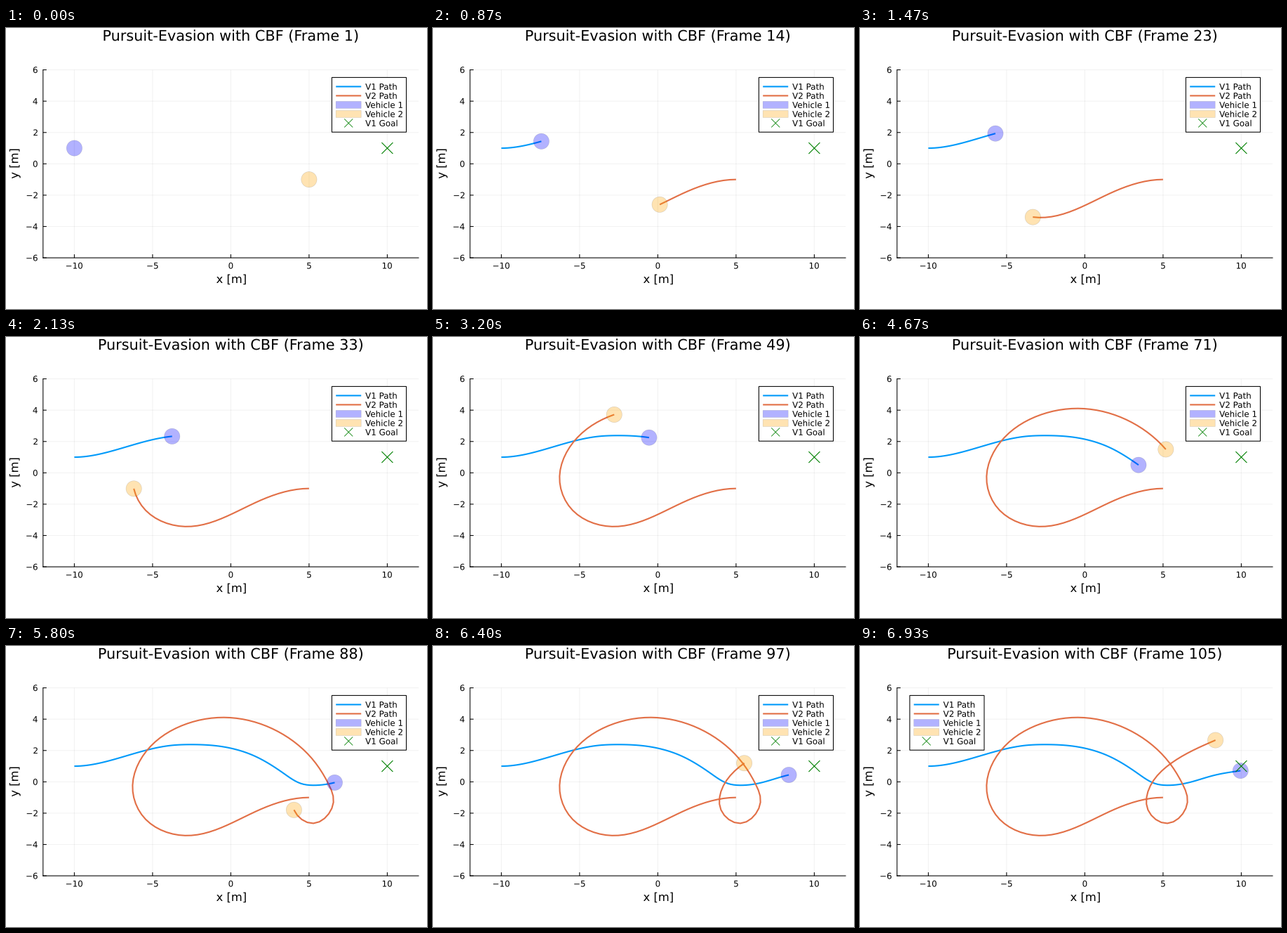
Write a matplotlib script that moves like this. It is 600x400 px and loops after 6.99 s.

```python
import numpy as np
import matplotlib.pyplot as plt
from matplotlib.animation import FuncAnimation
from matplotlib.patches import Circle, PathPatch, Rectangle
from matplotlib.textpath import TextPath
from matplotlib.transforms import Affine2D

W, H, DPI = 600, 400, 100
FRAMES, LOOP_MS = 105, 6990
LEGEND_SWAP = 103               # the legend avoids vehicle 2 from here on
UNIT, X0, Y0 = 22.3, 320.4, 193.35
PT = 72 / DPI                   # points per pixel

BLUE, ORANGE = "#009afa", "#e26f46"
FILL_1, FILL_2 = (0, 0, 1, 0.3), (1, 0.647, 0, 0.3)
EDGE, GRID = (0, 0, 0, 0.15), (0, 0, 0, 0.05)

plt.rcParams["font.family"] = "DejaVu Sans"
plt.rcParams["path.snap"] = False


def px(x):
    return X0 + UNIT * x


def py(y):
    return Y0 - UNIT * y


def drive(heading, *keys):
    """Constant-speed positions on a cubic spline through the key points.

    The spline leaves the first point along the heading."""
    p = np.array(keys)
    h = np.hypot(*np.diff(p, axis=0).T)
    t = np.r_[0, np.cumsum(h)]
    slope = np.diff(p, axis=0) / h[:, None]
    a, b = np.eye(len(p)), np.zeros_like(p)
    a[0, :2] = 2 * h[0], h[0]
    b[0] = 6 * (slope[0] - heading)
    for i in range(1, len(p) - 1):
        a[i, i - 1:i + 2] = h[i - 1], 2 * (h[i - 1] + h[i]), h[i]
        b[i] = 6 * (slope[i] - slope[i - 1])
    m = np.linalg.solve(a, b)

    s = np.linspace(0, t[-1], 3000)
    k = np.clip(np.searchsorted(t, s) - 1, 0, len(h) - 1)
    hk, u, v = h[k, None], (t[k + 1] - s)[:, None], (s - t[k])[:, None]
    c = ((m[k] * u**3 + m[k + 1] * v**3) / (6 * hk)
         + (p[k] / hk - m[k] * hk / 6) * u
         + (p[k + 1] / hk - m[k + 1] * hk / 6) * v)

    dist = np.r_[0, np.cumsum(np.hypot(*np.diff(c, axis=0).T))]
    at = np.linspace(0, dist[-1], FRAMES)
    return np.c_[px(np.interp(at, dist, c[:, 0])),
                 py(np.interp(at, dist, c[:, 1]))]


ROUTE_1 = drive(
    (1, 0), (-10, 1), (-7.43, 1.44), (-5.4, 2.02), (-3.75, 2.33),
    (-2.6, 2.38), (-0.56, 2.25), (1.4, 1.7), (3.42, 0.51), (4.55, -0.13),
    (5.3, -0.22), (6.63, -0.05), (8.2, 0.4), (9.95, 0.71))

ROUTE_2 = drive(
    (-1, 0), (5, -1), (2.05, -1.69), (0.1, -2.61), (-2.9, -3.43),
    (-5.54, -2.29), (-6.28, -0.38), (-5.34, 2.03), (-2.75, 3.73),
    (-0.45, 4.11), (2.22, 3.58), (5.2, 1.47), (6.26, -0.17), (6.56, -1.3),
    (5.28, -2.65), (4.04, -1.8), (4.15, -0.33), (5.44, 1.13), (8.35, 2.66))

fig = plt.figure(figsize=(W / DPI, H / DPI), dpi=DPI, facecolor="white")
ax = fig.add_axes([0, 0, 1, 1])
ax.set(xlim=(0, W), ylim=(H, 0))
ax.axis("off")


def line(xs, ys, color="black", width=1.05, z=1, cap="butt"):
    return ax.plot(xs, ys, color=color, lw=width * PT, zorder=z,
                   solid_capstyle=cap, solid_joinstyle="round")[0]


def glyphs(x, y, s, size, align=0.5, turn=0):
    """Outline of a text on baseline y; align 0 is left, 1 is right."""
    path = TextPath((0, 0), s, size=size)
    box = path.get_extents()
    place = Affine2D().translate(-box.x0 - align * box.width, 0)
    return path.transformed(place.scale(1, -1).rotate_deg(turn).translate(x, y))


def text(*args, z=3, **kw):
    return ax.add_patch(PathPatch(glyphs(*args, **kw), fc="black", lw=0,
                                  zorder=z))


def cross(x, y, r, width, z):
    return [line([x - r, x + r], [y - d * r, y + d * r], "green", width, z)
            for d in (1, -1)]


def outlined(shape, color, z):
    shape.set(facecolor=color, edgecolor=EDGE, linewidth=0.6 * PT, zorder=z)
    return ax.add_patch(shape)


def legend(x, y):
    """Legend with its top left corner at (x, y)."""
    z = 10
    parts = [ax.add_patch(Rectangle((x, y), 106.1, 77.8, fc="white",
                                    ec="black", lw=1.05 * PT, zorder=z))]
    rows = [y + 13 * (i + 1) for i in range(5)]
    left, right = x + 5.8, x + 41.8
    for row, color in zip(rows, (BLUE, ORANGE)):
        parts.append(line([left, right], [row, row], color, 2.1, z + 1))
    for row, color in zip(rows[2:], (FILL_1, FILL_2)):
        parts.append(outlined(
            Rectangle((left, row - 5), right - left, 10), color, z + 1))
    parts += cross((left + right) / 2, rows[4], 6, 0.8, z + 1)
    names = "V1 Path", "V2 Path", "Vehicle 1", "Vehicle 2", "V1 Goal"
    for row, name in zip(rows, names):
        parts.append(text(x + 47.8, row + 4.4, name, 11.9, align=0, z=z + 1))
    return parts


def minus(v):
    return str(v).replace("-", "\u2212")


# grid, axes and labels
west, east, north, south = px(-12), px(12), py(6), py(-6)
for v in range(-10, 11, 5):
    line([px(v)] * 2, [north, south], GRID, z=0)
    line([px(v)] * 2, [south, south - 5])
    text(px(v), 342.6, minus(v), 11.9)
for v in range(-6, 7, 2):
    line([west, east], [py(v)] * 2, GRID, z=0)
    line([west, west + 5], [py(v)] * 2)
    text(44.8, py(v) + 4.4, minus(v), 11.9, align=1)
line([west, east], [south, south], cap="projecting")
line([west, west], [north, south], cap="projecting")
text(px(0) + 0.5, 363, "x [m]", 16.35)
text(17.3, py(0), "y [m]", 16.35, turn=-90)
title = text(px(0), 18.1, "Pursuit", 20.8)

# moving parts
path_1 = line([], [], BLUE, 2.1, 4)
path_2 = line([], [], ORANGE, 2.1, 5)
car_1 = outlined(Circle((0, 0), UNIT / 2), FILL_1, 6)
car_2 = outlined(Circle((0, 0), UNIT / 2), FILL_2, 7)
cross(px(10), py(1), 8, 1.1, 8)
legend_right = legend(464.4, 70.4)
legend_left = legend(70.9, 70.4)


def update(i):
    title.set_path(glyphs(
        px(0), 18.1, f"Pursuit-Evasion with CBF (Frame {i + 1})", 20.8))
    for path, car, route in ((path_1, car_1, ROUTE_1),
                             (path_2, car_2, ROUTE_2)):
        path.set_data(*route[:i + 1].T)
        path.set_visible(i > 0)
        car.center = route[i]
    swapped = i >= LEGEND_SWAP
    for part in legend_right:
        part.set_visible(not swapped)
    for part in legend_left:
        part.set_visible(swapped)
    return []


anim = FuncAnimation(fig, update, frames=FRAMES, interval=LOOP_MS / FRAMES,
                     init_func=lambda: update(0), repeat=True, repeat_delay=0,
                     blit=False)
plt.show()
```
